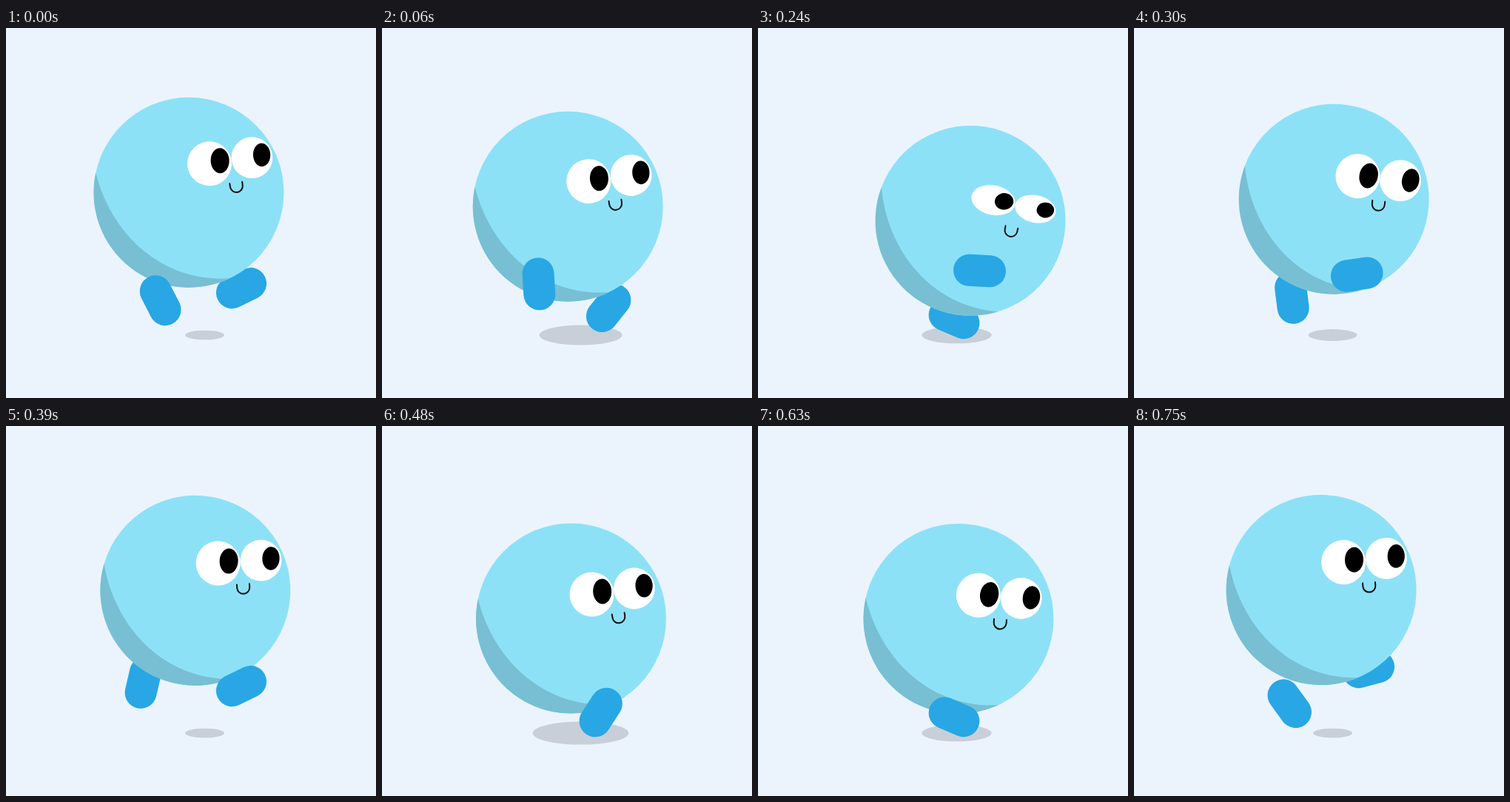
Write an HTML page with a canvas that moves like this. It is 500 by 500 pixels and loops after 810 ms.

```html
<!DOCTYPE html>
<html lang="en">
<head>
<meta charset="utf-8">
<title>Running ball</title>
<style>
  html, body { margin: 0; width: 100%; height: 100%; overflow: hidden; background: #ebf4fd; }
  canvas { display: block; }
</style>
</head>
<body>
<canvas id="stage" width="500" height="500"></canvas>
<script>
const ctx = document.getElementById('stage').getContext('2d');
const TAU = Math.PI * 2, RAD = Math.PI / 180;
const STEP = 30, LOOP = 810, LAST = 25;
const CYCLE = 26, STRIDE = 13, LANDING = 4, APEX = 12;
const RADIUS = 128.5;

const shade = new Path2D('M-125.7-26.7A128.5 128.5 0 0 0 55.3 116C-36 122-105 56.5-125.7-26.7Z');
const smile = new Path2D('M-8.5-6.5V-2A8.5 8.5 0 0 0 8.5-2V-6.5');
const capsule = new Path2D('M-14 0H14');

// Key poses of one foot: time, x, y, angle
const footPath = [
  [4, 218.7, 331, 99.5],   // kicked back
  [8, 299.5, 328, 3],      // swung forward
  [10, 301.2, 333, -8.6],
  [12, 317, 329, -15],
  [13, 318, 351.5, -26],   // reaching down
  [16, 295.7, 387, -57],   // heel strike
  [17, 277.5, 391, -36],
  [21, 265, 393.2, 23],    // rolling over
  [25.5, 208.5, 372, 58]   // push off
];

function ease(u) {
  u = Math.max(0, Math.min(1, u));
  return u * u * (3 - 2 * u);
}

// Smooth periodic curve through the key poses, without overshoot.
function footPose(t) {
  const n = footPath.length;
  const row = i => footPath[(i + n) % n];
  const time = i => row(i)[0] + CYCLE * Math.floor(i / n);
  const slope = (i, k) => (row(i + 1)[k] - row(i)[k]) / (time(i + 1) - time(i));
  const tangent = (i, k) => {
    const a = slope(i - 1, k), b = slope(i, k);
    return a * b > 0 ? 2 * a * b / (a + b) : 0;
  };
  t %= CYCLE;
  let i = n - 1;
  while (time(i) > t) i--;
  const span = time(i + 1) - time(i), u = (t - time(i)) / span;
  return [1, 2, 3].map(k => row(i)[k] + (row(i + 1)[k] - row(i)[k]) * ease(u)
    + span * u * (1 - u) * (tangent(i, k) * (1 - u) - tangent(i + 1, k) * u));
}

// The far foot runs half a cycle later and kicks higher after its push off.
function farFootPose(step) {
  const phase = step + STRIDE, sincePush = (phase + 5) % CYCLE;
  const kick = ease(sincePush / 2) * ease((16 - sincePush) / 13);
  const [x, y, angle] = footPose(phase);
  return [x - 25 * kick, y - 23 * kick, angle + 43 * kick];
}

// Rises quickly to 1 at the landing, then eases back to 0 at the apex.
function impact(s, release) {
  return s < LANDING ? Math.sin(s / LANDING * Math.PI / 2) : ease((APEX - s) / release);
}

function ballPose(step) {
  const s = step % STRIDE;
  const drop = Math.min(3.15 * (s + 0.5) ** 2, 2.43 * (APEX - s) ** 2, 66);
  const drift = 0.225 + 0.355 * ease((s - LANDING) / 4);
  const lean = 8.5 * ease((step - 4) / 4) * ease((16 - step) / 6) + 3 * ease((step - 19) / 6);
  return [246.8 + drift * drop + 120 * Math.sin(lean * RAD), 221.5 + drop, lean];
}

function facePose(step) {
  const s = step % STRIDE, nod = ease(1 - Math.abs(s - 8) / 4);
  return [28 - 1.5 * nod, -39 + 7 * impact(s, 4), -8 + 11.3 * nod];
}

function at([x, y, angle], draw) {
  ctx.save();
  ctx.translate(x, y);
  ctx.rotate(angle * RAD);
  draw();
  ctx.restore();
}

function ellipse(x, y, rx, ry, color, tilt = 0) {
  ctx.fillStyle = color;
  ctx.beginPath();
  ctx.ellipse(x, y, rx, ry, tilt * RAD, 0, TAU);
  ctx.fill();
}

function stroke(path, width, color) {
  ctx.lineWidth = width;
  ctx.strokeStyle = color;
  ctx.lineCap = 'round';
  ctx.stroke(path);
}

function foot(pose) {
  at(pose, () => stroke(capsule, 43, '#28a7e4'));
}

function eye(x, size, open) {
  ctx.save();
  ctx.translate(x, 0);
  ctx.scale(size, size * open);
  ellipse(0, 0, 30, 30, '#fff');
  ellipse(14.6, -2, 12.5, 17, '#000', 6);
  ctx.restore();
}

function ball(step) {
  const open = Math.max(0.1, Math.min(1, Math.abs(step - 6) / 3));
  at(ballPose(step), () => {
    ellipse(0, 0, RADIUS, RADIUS, '#8de1f6');
    ctx.fillStyle = '#78bfd3';
    ctx.fill(shade);
    at(facePose(step), () => {
      eye(0, 1, open);
      eye(58, 0.93, open);
      at([31.8, 37, 0], () => stroke(smile, 2, '#111'));
    });
  });
}

function draw(now) {
  const step = Math.min(LAST, Math.floor(now % LOOP / STEP));
  const spread = 26.5 + 41.5 * impact(step % STRIDE, 8);
  ctx.fillStyle = '#ebf4fd';
  ctx.fillRect(0, 0, 500, 500);
  ellipse(268.5, 415, spread, spread * 0.24, '#c8cfd8');
  foot(farFootPose(step));
  ball(step);
  foot(footPose(step));
}

const start = performance.now();
function tick() {
  draw(performance.now() - start);
  requestAnimationFrame(tick);
}
tick();
</script>
</body>
</html>
```
